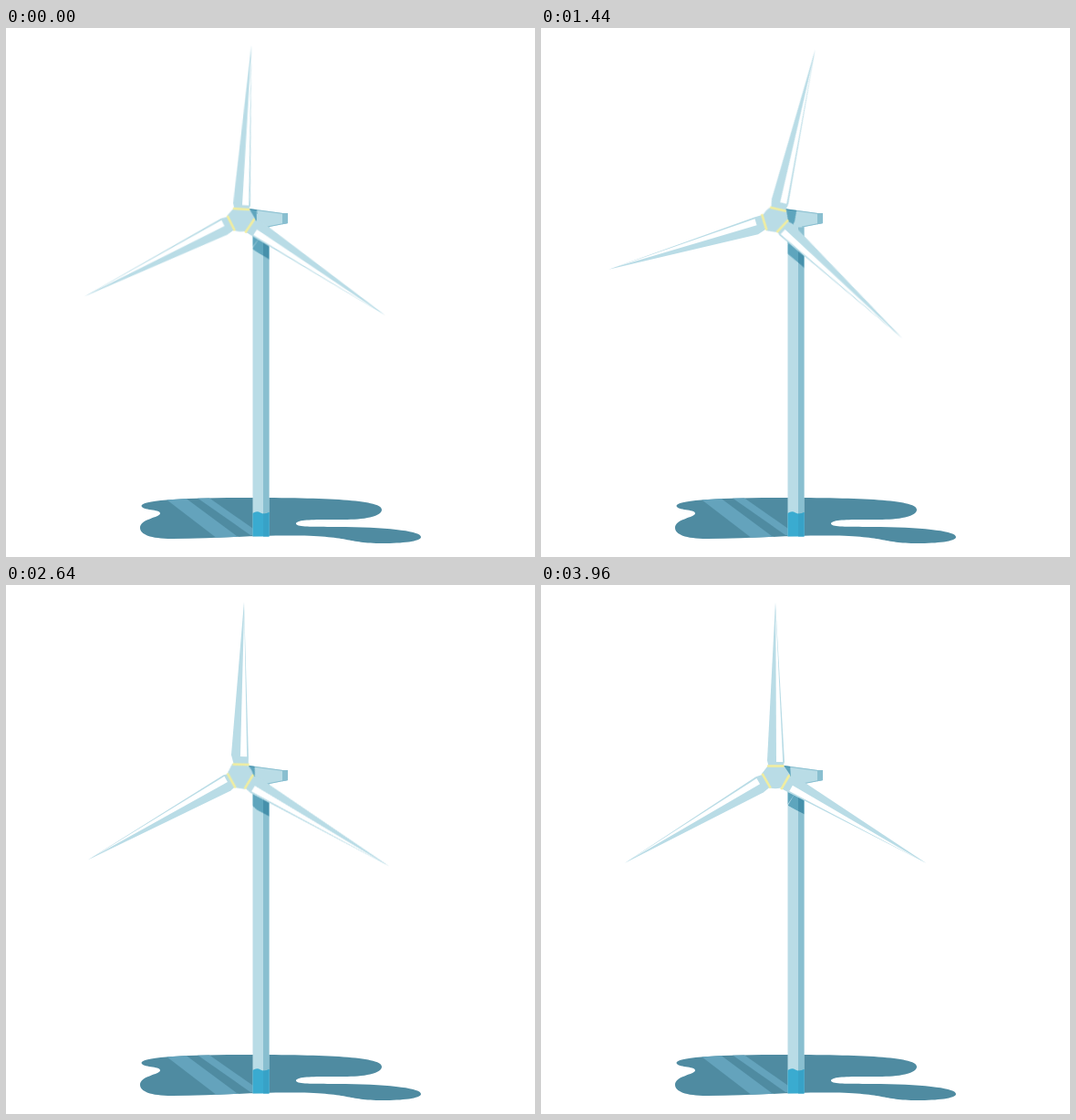
An HTML page for the animation above (4 s loop, 580 px wide and 580 px high).

```html
<!DOCTYPE html>
<html lang="en">
<head>
<meta charset="utf-8">
<title>Wind turbine</title>
<style>
  html, body { margin: 0; width: 100%; height: 100%; overflow: hidden; background: #fff; }
  svg { display: block; width: 100%; height: 100%; }
  .light { fill: #b9dce6; }
  .side { fill: #89bfd0; }
  .shadow { mix-blend-mode: multiply; }
  .shadow * { fill: #82c0d2; }
</style>
</head>
<body>
<svg viewBox="0 0 580 580">
  <defs>
    <path id="puddle" d="M148.500 524C149 518 190 515 270 515C360 515 412 518 412 528C412 536 392 539 370 539C345 539 318 538 318 543.500C318 548 345 546.500 372 547C425 548 455 552 455 558C455 563 434 565 413 565C372 565 380 556.500 310 556.500C265 556.500 225 560 182 560C158 560 147 555 147 548C147 538 169 537 169 532C169 527.500 149 529 148.500 524Z"/>
    <path id="tower" d="M270.500 217H288.500V557H270.500Z"/>
    <path id="nacelle" d="M266 198L303 203H309V214L286 218.500H266Z"/>
    <path id="hub" d="M-8.500 -11H9.500L16 -1.500L6 13Q0 14.500 -6 13L-15 -2.500Z"/>
    <clipPath id="inPuddle"><use href="#puddle"/></clipPath>
    <clipPath id="onBody"><use href="#tower"/><use href="#nacelle"/></clipPath>
  </defs>

  <use href="#puddle" fill="#4f8ba1"/>
  <g clip-path="url(#inPuddle)" fill="#64a3bc">
    <path d="M172 514H195L257 560H232Z"/>
    <path d="M208 514H221L274 551V556H268Z"/>
  </g>

  <use href="#tower" class="light"/>
  <path class="side" d="M282 217H288.500V557H282Z"/>
  <path fill="#3aabd0" d="M270.500 532Q275 529 279 531.500T288.500 531V557.500H270.500Z"/>
  <path fill="#37a2c7" d="M282 532.300Q285 533 288.500 531V557.500H282Z"/>
  <use href="#nacelle" class="light"/>
  <path class="side" d="M303 203H309V214L303 215.200Z"/>
  <path d="M266 198.400L303 203.400M309 213.600L286 218.100" fill="none" stroke="#89bfd0"/>

  <g class="shadow" clip-path="url(#onBody)">
    <g class="rotor" data-x="264" data-y="228">
      <g id="shadowBlades"></g>
      <use href="#hub"/>
    </g>
  </g>
  <g class="rotor" data-x="257" data-y="209.500">
    <g id="blades"></g>
    <use href="#hub" class="light"/>
    <g id="bands" stroke="#f0eda0" stroke-width="2.600"></g>
  </g>
</svg>
<script>
  const LOOP = 4000, STEP = 40;
  // Each blade: angle, distance of its band and window from the hub, sideways shift of its root.
  const blades = [
    { angle: 0, band: 11, window: 15.5, shift: 0 },
    { angle: 120, band: 12.7, window: 21.5, shift: -1.5 },
    { angle: 240, band: 11.2, window: 19, shift: 0 }
  ];
  const byId = id => document.getElementById(id);
  const join = draw => blades.map(b => `<g transform="rotate(${b.angle})">${draw(b)}</g>`).join('');

  const body = ({ band, window: w, shift: s }) =>
    `<path class="light" d="M0 -191L${s - 9} ${-w - 1.5}L-7.500 ${-band}H8.500L${s + 10} ${-w}Z"/>`;
  const opening = ({ window: w, shift: s }) =>
    `<path fill="#fff" d="M.3 -182L${s + 1} ${-w}H${s + 8.2}Z"/>`;
  const stripe = ({ band }) => `<path d="M-8.800 ${-band}H9.500"/>`;

  byId('shadowBlades').innerHTML = join(body);
  byId('blades').innerHTML = join(b => body(b) + opening(b));
  byId('bands').innerHTML = join(stripe);

  const rotors = document.querySelectorAll('.rotor');
  function draw(now) {
    const step = Math.floor((now % LOOP) / STEP);
    const angle = (step + 1) * 360 * STEP / LOOP;
    for (const r of rotors)
      r.setAttribute('transform', `translate(${r.dataset.x} ${r.dataset.y}) rotate(${angle})`);
  }
  function tick() {
    draw(performance.now());
    requestAnimationFrame(tick);
  }
  tick();
</script>
</body>
</html>
```
